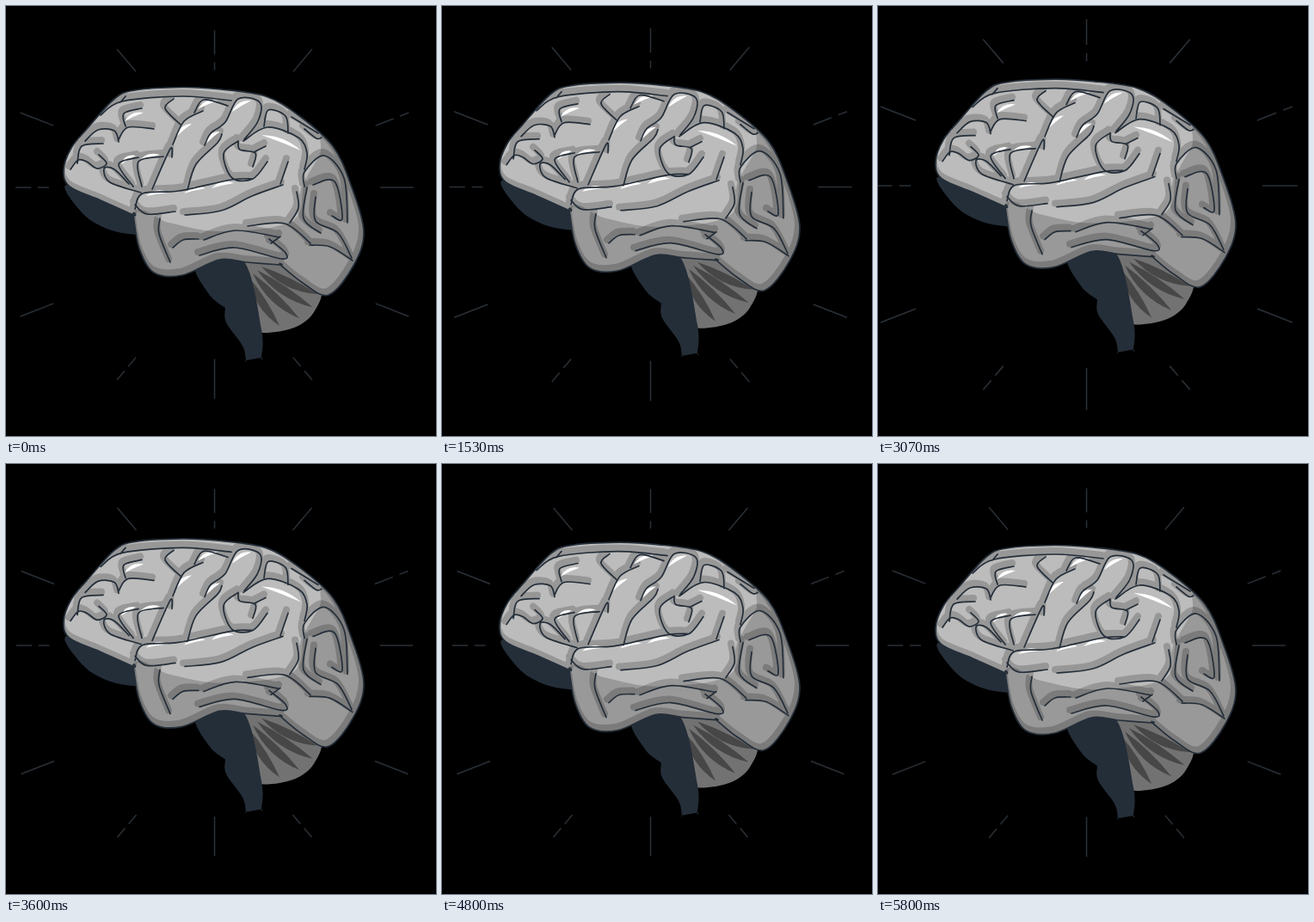
Write an HTML page with a canvas that moves like this. It is 500 by 500 pixels and loops after 6.07 s.

```html
<!DOCTYPE html>
<html lang="en">
<head>
<meta charset="utf-8">
<title>Brain</title>
<style>
html, body { margin: 0; height: 100%; overflow: hidden; background: #000; }
canvas { display: block; width: 100vmin; height: 100vmin; }
</style>
</head>
<body>
<canvas id="stage" width="500" height="500"></canvas>
<script>
const ctx = document.getElementById('stage').getContext('2d');
const INK = '#242e39', LIGHT = '#bcbcbc', MID = '#999', SHADOW = 'rgba(0,0,0,.2)';
const LOOP = 6070, END = 5800, STEP = 200 / 3, CENTER = 242.5;

// Smooth curve through x,y pairs; a repeated point makes a corner.
function curve(p, closed) {
  const n = p.length / 2, path = new Path2D();
  const at = i => {
    const k = closed ? (i + n) % n : Math.max(0, Math.min(n - 1, i));
    return [p[2 * k], p[2 * k + 1]];
  };
  path.moveTo(p[0], p[1]);
  for (let i = 0; i < (closed ? n : n - 1); i++) {
    const [a, b, c, d] = [at(i - 1), at(i), at(i + 1), at(i + 2)];
    path.bezierCurveTo(b[0] + (c[0] - a[0]) / 6, b[1] + (c[1] - a[1]) / 6,
      c[0] - (d[0] - b[0]) / 6, c[1] - (d[1] - b[1]) / 6, c[0], c[1]);
  }
  return path;
}
const blob = (...p) => curve(p, true);

// Lens between two points, bent sideways by `bend` and `thick` wide
function leaf(x1, y1, x2, y2, bend, thick) {
  const path = new Path2D(), len = Math.hypot(x2 - x1, y2 - y1);
  const mid = k => [(x1 + x2) / 2 + (y2 - y1) / len * k, (y1 + y2) / 2 - (x2 - x1) / len * k];
  path.moveTo(x1, y1);
  path.quadraticCurveTo(...mid(bend + thick), x2, y2);
  path.quadraticCurveTo(...mid(bend - thick), x1, y1);
  return path;
}

const body = blob(67,190, 76,165, 94,143, 126,108, 150,98, 205,94.5, 250,97, 302,105, 340,127,
  380,163, 401,208, 416,262, 404,302, 375,336, 345,322, 319,301, 319,301, 280,298, 248,295,
  205,313, 172,310, 155,282, 148,243, 148,243, 110,226, 74,210);
const rearTone = blob(371,146, 365,172, 347,205, 333,250, 250,262, 190,252, 147,241,
  130,335, 380,350, 440,330, 430,150);
const underside = blob(71,208, 90,242, 120,260, 151,266, 151,266, 152,240, 152,240);
const stem = blob(221,300, 236,335, 255,351, 255,351, 256,368, 275,395, 279,412, 279,412,
  297,409, 297,409, 297,376, 275,295);
const cerebellum = blob(266,296, 273,318, 272,350, 280,373, 300,380, 335,374, 358,356, 365,325, 320,296);

const frontal = [
  [110,127, 135,111, 205,105, 262,110],
  [133,112, 139,105],
  [158,119, 137,125, 139,140],
  [92,157, 107,144, 126,145, 131,158],
  [131,155, 142,141, 172,143],
  [83,183, 88,163, 113,160],
  [75,190, 84,179, 94,181, 106,189, 117,183, 108,173],
  [157,217, 121,205, 114,189, 126,190, 143,207],
  [148,210, 131,184, 154,176],
  [158,210, 154,181, 183,175],
  [170,213, 191,166, 193,176]
];
const central = [
  [194,161, 207,134, 229,122],
  [195,108, 185,119, 203,138],
  [219,124, 230,109, 258,116],
  [211,214, 221,184, 246,159, 251,149],
  [231,162, 238,148, 255,135, 270,108, 295,112, 293,134, 277,155],
  [300,140, 305,121, 325,128, 328,148],
  [270,157, 253,172, 263,200, 287,201, 304,181],
  [270,157, 272,167, 290,171, 287,187],
  [288,170, 302,163],
  [276,157, 304,141, 340,153, 350,171, 347,190],
  [328,181, 319,207]
];
const temporal = [
  [208,243, 250,238, 286,221, 322,208],
  [150,236, 159,218, 201,215, 262,202, 287,201],
  [150,231, 164,242, 197,239],
  [179,247, 178,265, 191,298],
  [194,281, 206,272, 224,271],
  [230,272, 267,261, 318,269],
  [225,290, 266,281, 320,294, 325,287, 306,271],
  [308,276, 319,268]
];
const occipital = [
  [281,256, 324,253, 354,276],
  [353,278, 377,280, 403,296],
  [338,216, 340,235, 330,252],
  [350,211, 346,247, 366,264],
  [347,210, 347,193, 370,174, 393,200, 397,252],
  [357,208, 382,204, 391,247, 379,244],
  [360,222, 360,250, 386,264, 402,293],
  [332,129, 363,148],
  [347,143, 361,154, 367,153]
];
const folds = new Path2D();
for (const p of [...frontal, ...central, ...temporal, ...occipital]) folds.addPath(curve(p, false));

// Glints: both ends of each crescent
const glints = [
  [138,134, 160,124], [134,184, 151,174], [154,181, 179,173], [223,120, 246,110],
  [198,152, 216,137], [231,161, 249,146], [263,123, 285,110], [297,150, 343,168],
  [163,221, 189,217], [207,218, 232,212], [239,212, 265,206]
].map(p => leaf(...p, 5, 4));

const stripes = Array.from({ length: 5 }, (_, i) => {
  const a = i * Math.PI / 8;
  return leaf(277 + 5 * i, 319 - 4 * i, 291 + 71 * Math.sin(a), 335 + 40 * Math.cos(a), -5, 10);
});

// Half-spokes from the center, mirrored into the quadrants; a gap is where a break begins (0: none),
// in the order upper right, upper left, lower right, lower left.
const spokes = [
  { from: [0, -213.5], to: [0, -167.5], gaps: [.61, .61, 0, 0] },
  { from: [113, -191.5], to: [91, -165.5], gaps: [0, 0, .4, .4] },
  { from: [225, -118], to: [186.5, -103], gaps: [.26, 0, 0, 0] },
  { from: [230.5, -31.5], to: [192, -31.5], gaps: [0, .47] }
];
const rays = new Path2D();
for (const { from: [x1, y1], to: [x2, y2], gaps } of spokes) {
  gaps.forEach((gap, q) => {
    const sx = q % 2 ? -1 : 1, sy = q < 2 ? 1 : -1;
    const dash = (a, b) => {
      rays.moveTo(sx * (x1 + (x2 - x1) * a), sy * (y1 + (y2 - y1) * a));
      rays.lineTo(sx * (x1 + (x2 - x1) * b), sy * (y1 + (y2 - y1) * b));
    };
    if (gap) dash(0, gap);
    dash(gap && gap + .2, 1);
  });
}

// Rises 0 to 1 at `peak`, falls back to 0 at `end`
const ramp = (t, start, peak, end) =>
  Math.max(0, Math.min((t - start) / (peak - start), (end - t) / (end - peak)));

function fill(color, ...paths) {
  ctx.fillStyle = color;
  paths.forEach(p => ctx.fill(p));
}
function stroke(color, width, ...paths) {
  ctx.strokeStyle = color;
  ctx.lineWidth = width;
  paths.forEach(p => ctx.stroke(p));
}

function drawRays(scale) {
  ctx.save();
  ctx.translate(CENTER, CENTER);
  ctx.scale(scale, scale);
  stroke('#2a3037', 1.5, rays);
  ctx.restore();
}

function drawBrain(y) {
  ctx.save();
  ctx.translate(0, y);
  ctx.lineCap = ctx.lineJoin = 'round';
  fill(INK, underside);
  fill('#727272', cerebellum);
  fill('#474747', ...stripes);
  fill(INK, stem);
  fill(LIGHT, body);
  ctx.save();
  ctx.clip(body);
  fill(MID, rearTone);
  // Every fold and the rim cast a soft band up and to the left.
  ctx.translate(-2, -4);
  const bands = new Path2D(folds);
  bands.addPath(body);
  stroke(SHADOW, 8, bands);
  ctx.translate(2, 4);
  fill('#fff', ...glints);
  ctx.restore();
  stroke(INK, 1.7, body, folds);
  ctx.restore();
}

function draw() {
  const now = Math.min(performance.now() % LOOP, END);
  const t = Math.floor((now + 4) / STEP) * STEP;
  ctx.fillStyle = '#000';
  ctx.fillRect(0, 0, 500, 500);
  const pulse = ramp(t, -22, 568, 1707) + ramp(t, 2295, 2870, 3420) + ramp(t, END - 22, END + 568, 2 * END);
  drawRays(1 + .1 * pulse);
  drawBrain(-10 * ramp(t, 0, END / 2, END));
  requestAnimationFrame(draw);
}
draw();
</script>
</body>
</html>
```
